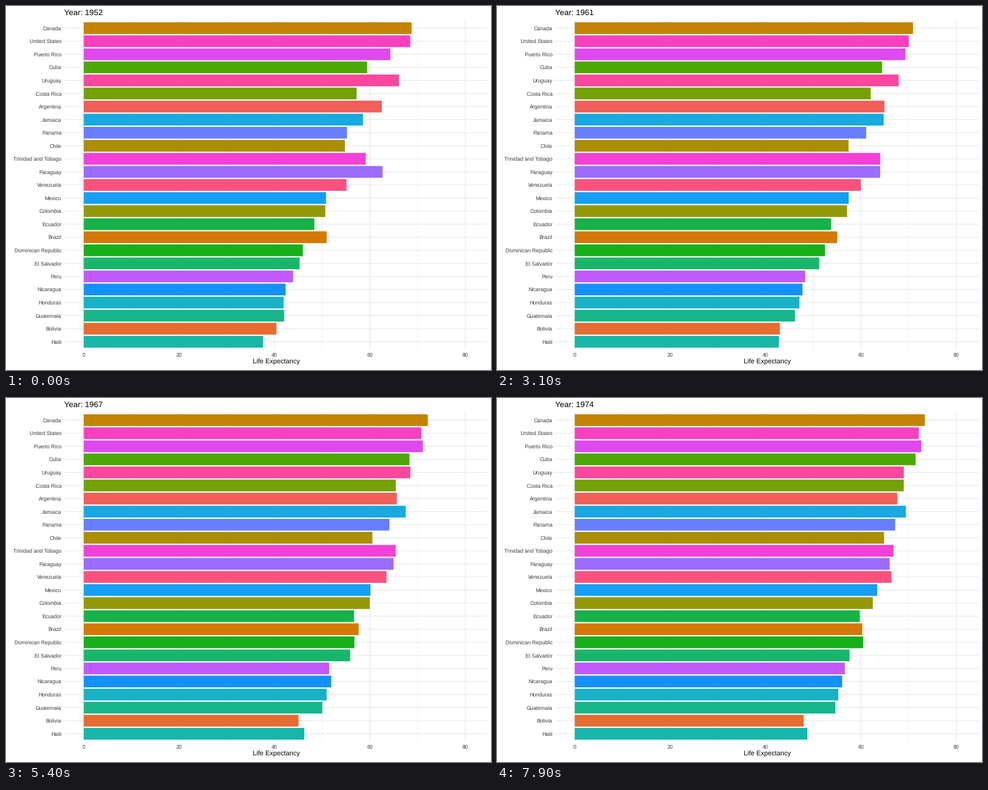
Recreate the animation shown at these times as a matplotlib script. Size 800 by 600 pixels, loop 8000 ms.

```python
import numpy as np
import matplotlib.pyplot as plt
from matplotlib.animation import FuncAnimation

W, H, DPI = 800, 600, 100
FRAMES, INTERVAL = 80, 100
STEP = 18                        # frames between two surveys
LEFT, RIGHT, TOP, BOTTOM = 96.5, 794.5, 23.6, 566.4
X_MAX = 80.653                   # longest bar over the whole period
SCALE = (RIGHT - LEFT) / (1.1 * X_MAX)
ZERO = LEFT + 0.05 * X_MAX * SCALE
PITCH = (BOTTOM - TOP) / 25.2
GRID, TICK_TEXT = "#e7e7e7", "#3c3c3c"

# Life expectancy every five years from 1952
LIFE = {
    "Canada": [68.75, 69.96, 71.3, 72.13, 72.88, 74.21],
    "United States": [68.44, 69.49, 70.21, 70.76, 71.34, 73.38],
    "Puerto Rico": [64.28, 68.54, 69.62, 71.1, 72.16, 73.44],
    "Cuba": [59.42, 62.33, 65.25, 68.29, 70.72, 72.65],
    "Uruguay": [66.07, 67.04, 68.25, 68.47, 68.67, 69.48],
    "Costa Rica": [57.21, 60.03, 62.84, 65.42, 67.85, 70.75],
    "Argentina": [62.49, 64.4, 65.14, 65.63, 67.07, 68.48],
    "Jamaica": [58.53, 62.61, 65.61, 67.51, 69.0, 70.11],
    "Panama": [55.19, 59.2, 61.82, 64.07, 66.22, 68.68],
    "Chile": [54.75, 56.07, 57.92, 60.52, 63.44, 67.05],
    "Trinidad and Tobago": [59.1, 61.8, 64.9, 65.4, 65.9, 68.3],
    "Paraguay": [62.65, 63.2, 64.36, 64.95, 65.82, 66.35],
    "Venezuela": [55.09, 57.91, 60.77, 63.48, 65.71, 67.46],
    "Mexico": [50.79, 55.19, 58.3, 60.11, 62.36, 65.03],
    "Colombia": [50.64, 55.12, 57.86, 59.96, 61.62, 63.84],
    "Ecuador": [48.36, 51.36, 54.64, 56.68, 58.8, 61.31],
    "Brazil": [50.92, 53.29, 55.67, 57.63, 59.5, 61.49],
    "Dominican Republic": [45.93, 49.83, 53.46, 56.75, 59.63, 61.79],
    "El Salvador": [45.26, 48.57, 52.31, 55.86, 58.21, 56.7],
    "Peru": [43.9, 46.26, 49.1, 51.45, 55.45, 58.45],
    "Nicaragua": [42.31, 45.43, 48.63, 51.88, 55.15, 57.47],
    "Honduras": [41.91, 44.67, 48.04, 50.92, 53.88, 57.4],
    "Guatemala": [42.02, 44.14, 46.95, 50.02, 53.74, 56.03],
    "Bolivia": [40.41, 41.89, 43.43, 45.03, 46.71, 50.02],
    "Haiti": [37.58, 40.7, 43.59, 46.24, 48.04, 49.92],
}
NAMES = list(LIFE)
VALUES = np.array(list(LIFE.values()))

TO_RGB = np.array([[3.2406, -1.5372, -0.4986],
                   [-0.9689, 1.8758, 0.0415],
                   [0.0557, -0.2040, 1.0570]])
TO_DISPLAY = np.array([[0.972, 0.027, 0.001],
                       [-0.020, 1.058, -0.038],
                       [0.000, 0.003, 0.997]])


def hue_color(hue, chroma=100, light=65):
    """Polar LUV colour in a gamma 1.8 display space."""
    a = np.radians(hue)
    u = chroma * np.cos(a) / (13 * light) + 0.19784
    v = chroma * np.sin(a) / (13 * light) + 0.46834
    y = ((light + 16) / 116) ** 3
    xyz = np.array([9 * u, 4 * v, 12 - 3 * u - 20 * v]) * y / (4 * v)
    rgb = np.clip(TO_RGB @ xyz, 0, 1)
    return tuple(np.clip(TO_DISPLAY @ rgb, 0, 1) ** (1 / 1.8))


def px(size):
    return size * 72 / DPI


def x_pos(value):
    return ZERO + SCALE * value


plt.rcParams.update({"font.family": "Liberation Sans",
                     "text.hinting": "no_hinting",
                     "toolbar": "None"})
fig = plt.figure(figsize=(W / DPI, H / DPI), dpi=DPI, facecolor="white")
ax = fig.add_axes([0, 0, 1, 1])
ax.set(xlim=(0, W), ylim=(H, 0))
ax.axis("off")


def label(x, y, text, size, color="black", ha="left"):
    return ax.text(x, y, text, fontsize=px(size), color=color, ha=ha,
                   va="baseline")


rows = TOP + PITCH * (0.6 + np.arange(len(NAMES)))
line = dict(colors=GRID, snap=False, zorder=1)
ax.vlines(x_pos(np.arange(10, 80, 20)), TOP, BOTTOM, lw=px(0.53), **line)
ax.hlines(rows, LEFT, RIGHT, lw=px(1.07), **line)
ax.vlines(x_pos(np.arange(0, 81, 20)), TOP, BOTTOM, lw=px(1.07), **line)

order = sorted(NAMES)
colors = [hue_color(15 + 360 * order.index(n) / len(order)) for n in NAMES]
bars = ax.barh(rows, SCALE * VALUES[:, 0], left=ZERO, height=0.9 * PITCH,
               color=colors, linewidth=0, snap=False, zorder=2)
ax.set(xlim=(0, W), ylim=(H, 0))

for name, y in zip(NAMES, rows):
    label(91.5, y + 3.2, name, 8.8, TICK_TEXT, "right")
for tick in range(0, 81, 20):
    label(x_pos(tick), 578, str(tick), 8.8, TICK_TEXT, "center")
label((LEFT + RIGHT) / 2, 590, "Life Expectancy", 11, ha="center")
title = label(LEFT, 15, "Year: 1952", 13.2)


def update(frame):
    k, part = divmod(frame, STEP)
    t = part / STEP
    life = VALUES[:, k] * (1 - t) + VALUES[:, k + 1] * t
    for bar, value in zip(bars, life):
        bar.set_width(SCALE * value)
    title.set_text(f"Year: {round(1952 + 55 * frame / 199)}")
    return [*bars, title]


anim = FuncAnimation(fig, update, frames=FRAMES, interval=INTERVAL,
                     repeat=True, repeat_delay=0, blit=False)
plt.show()
```
